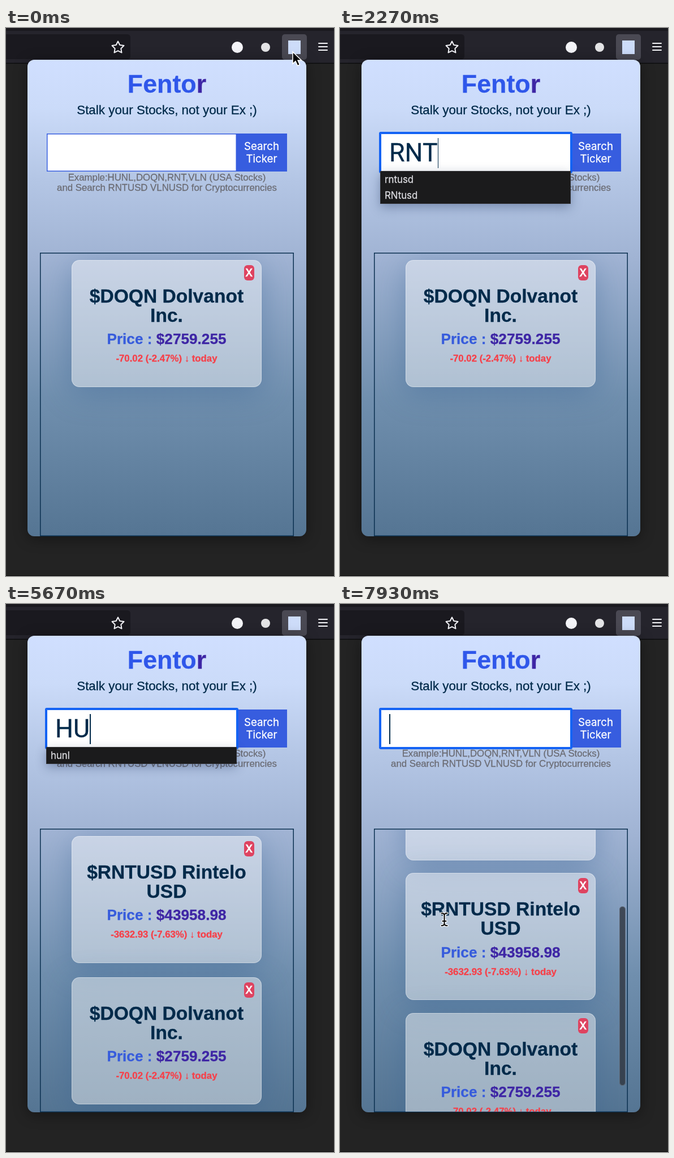
These frames come from a looping animation (580 by 966 pixels, 8000 ms). An HTML page:

```html
<!DOCTYPE html>
<html lang="en">
<head>
<meta charset="utf-8">
<title>Ticker popup</title>
<style>
html, body { margin: 0; width: 100%; height: 100%; overflow: hidden; background: #232323; }
body {
  position: relative; font-family: "Liberation Sans", Arial, sans-serif; color: #012a4a; white-space: nowrap;
  box-shadow: inset 0 -1px #0d0d0e; -webkit-text-stroke: .3px;
}
div, svg { position: absolute; box-sizing: border-box; }
.center { left: 0; width: 100%; text-align: center; }
#bar { left: 0; top: 0; width: 580px; height: 63px; }
#popup {
  left: 38px; top: 56px; width: 493px; height: 840px; border-radius: 12px; overflow: hidden;
  background: linear-gradient(#d0dfff, #cbdbf9 10%, #b4c6e5 25%, #a0b3d3 42%, #708fae 71%, #557593);
}
#shade { left: 38px; top: 56px; width: 493px; height: 840px; border-radius: 12px; box-shadow: 0 4px 24px rgba(0,0,0,.4); }
#title { top: 14px; font: bold 44.8px/56px "Liberation Sans", Arial, sans-serif; color: #2f57ea; }
#title b, .price b { color: #3e26a5; }
#tag { top: 75px; font-size: 22.4px; line-height: 28px; }
#hint { top: 199px; font-size: 16.8px; line-height: 17.5px; color: #6b6c74; }
#field { left: 34px; top: 130px; width: 336px; height: 67px; background: #fff; box-shadow: inset 0 0 0 1.5px #375ee0; }
#field.focus { box-shadow: 0 0 0 3px #1463f4, inset 0 0 0 1px #1463f4; border-radius: 1px; }
#entry { left: 15px; top: 0; height: 68px; display: flex; align-items: center; font: 44.8px/60px Roboto, sans-serif; }
#caret { width: 1.5px; height: 53px; background: #012a4a; }
#button {
  left: 369px; top: 130px; width: 90px; height: 67px; padding-top: 12px; background: #375ddf; color: #fff;
  text-align: center; font: 18.67px/22.4px Inter, sans-serif;
}
#menu {
  left: 33px; top: 196px; width: 337px; padding: 1px 8px; background: #1b1b1c; color: #dcdce0; white-space: pre;
  font: 16.8px/28px Inter, sans-serif; box-shadow: 0 6px 18px rgba(20,40,80,.35), inset 0 0 0 1px #333336;
}
#list { left: 22px; top: 340px; width: 448.5px; height: 500px; box-shadow: inset 0 0 0 1.5px #0b3050; }
#view { left: 1.5px; top: 1.5px; width: 445.5px; height: 497px; overflow: hidden; }
.card {
  left: 54.5px; width: 336px; height: 224px; border-radius: 14px; padding-top: 46px; text-align: center; font-weight: bold;
  background: rgba(255,255,255,.43); border: 1.5px solid rgba(255,255,255,.36);
  box-shadow: 0 10px 54px rgba(50,95,145,.4);
}
.name, .price, .change { display: block; }
.name { font-size: 33.6px; line-height: 34.4px; }
.price { font-size: 26.2px; line-height: 48px; color: #375cdc; }
.change { font-size: 16.8px; line-height: 21px; color: #f6414a; }
.close {
  right: 12px; top: 8px; width: 18.5px; height: 27px; border-radius: 6px; background: #de4360; color: #fff;
  font: 600 18.67px/28px Inter, sans-serif; display: flex; justify-content: center;
}
#thumb { left: 434px; width: 11px; height: 316px; border-radius: 6px; background: rgba(48,54,64,.82); box-shadow: inset 0 0 0 1px rgba(150,160,175,.4); }
#cursor { left: 0; top: 0; overflow: visible; }
</style>
</head>
<body>
<svg id="bar" viewBox="0 0 580 63">
  <path fill="#25242c" d="M0 0h580v62H0z"/>
  <path fill="#1a191f" d="M0 0h580v5H0zM0 11h214q6 0 6 6v32q0 6-6 6H0z"/>
  <path fill="#0d0d0e" d="M0 61.5h580v1.5H0z"/>
  <rect x="488" y="11" width="44" height="45" rx="5" fill="#4a4953"/>
  <rect x="499" y="22" width="22" height="24" fill="#cddcf9"/>
  <circle cx="409" cy="34" r="10" fill="#f4f4f8"/>
  <circle cx="459" cy="34" r="8" fill="#e4e4e6"/>
  <path id="star" fill="none" stroke="#f4f4f8" stroke-width="2" stroke-linejoin="round"/>
  <path stroke="#f4f4f8" stroke-width="2" stroke-linecap="round" d="M553 27h15M553 33h15M553 39h15"/>
</svg>
<div id="shade"></div>
<div id="popup">
  <div id="title" class="center">Fento<b>r</b></div>
  <div id="tag" class="center">Stalk your Stocks, not your Ex ;)</div>
  <div id="hint" class="center">Example:HUNL,DOQN,RNT,VLN (USA Stocks)<br>and Search RNTUSD VLNUSD for Cryptocurrencies</div>
  <div id="button">Search<br>Ticker</div>
  <div id="field"><div id="entry"><span id="typed"></span><span id="caret"></span></div></div>
  <div id="list"><div id="view"></div><div id="thumb"></div></div>
  <div id="menu"></div>
</div>
<svg id="cursor" width="1" height="1">
  <path id="arrow" fill="#000" stroke="#fff" stroke-width="1.5" d="M0 0V21L5 16.5L8.6 24.5L12.4 22.8L9 15H15.5Z"/>
  <g id="beam" fill="none" stroke-linecap="round">
    <path id="beamEdge" stroke="#fff" stroke-width="4.5"/>
    <path id="beamCore" stroke="#000" stroke-width="2"/>
  </g>
</svg>
<script>
const LOOP = 8000, FPS = 15;
const $ = id => document.getElementById(id);
const show = (el, on) => { el.style.visibility = on ? 'visible' : 'hidden'; };
const ramp = (t, a, b) => Math.min(1, Math.max(0, (t - a) / (b - a)));
const smooth = x => x * x * (3 - 2 * x);
const mix = (a, b, k) => a + (b - a) * k;

$('star').setAttribute('d', 'M' + Array.from({ length: 10 }, (_, i) => {
  const a = i * Math.PI / 5, r = i % 2 ? 5.6 : 11;
  return (198 + r * Math.sin(a)).toFixed(1) + ' ' + (34.5 - r * Math.cos(a)).toFixed(1);
}).join('L') + 'Z');
for (const id of ['beamEdge', 'beamCore'])
  $(id).setAttribute('d', 'M-5 -11Q0 -11 0 -7Q0 -11 5 -11M0 -7V7M-5 11Q0 11 0 7Q0 11 5 11M-3 3H3');

// Newest first; each card appears at its own time.
const cards = [
  [6600, '$HUNL Hunel Inc.', '$142.4', '-3.66 (-2.51%)'],
  [4400, '$RNTUSD Rintelo<br>USD', '$43958.98', '-3632.93 (-7.63%)'],
  [0, '$DOQN Dolvanot<br>Inc.', '$2759.255', '-70.02 (-2.47%)']
].map(([since, name, price, change]) => {
  const el = document.createElement('div');
  el.className = 'card';
  el.innerHTML = `<div class="close">X</div><span class="name">${name}</span>` +
    `<span class="price">Price : <b>${price}</b></span><span class="change">${change} ↓ today</span>`;
  $('view').append(el);
  return { since, el };
});

const history = ['rntusd', 'ranusd', 'RNtusd', 'hunl'];
const entries = [
  { word: 'RNTUSD', keys: [1330, 1730, 2130, 2530, 2600, 2800], enter: 3000, clear: 4400 },
  { word: 'HUNL', keys: [5000, 5330, 5670, 6000], enter: 6200, clear: 6600 }
];
const FOCUS = 600;

function drawField(t) {
  let text = '', busy = false, last = FOCUS;
  for (const { word, keys, enter, clear } of entries) {
    const pressed = keys.filter(k => t >= k);
    if (pressed.length) last = pressed.at(-1);
    if (t >= clear) last = clear;
    else if (pressed.length) {
      text = word.slice(0, pressed.length);
      busy = t >= enter;
    }
  }
  $('field').className = t >= FOCUS ? 'focus' : '';
  $('typed').textContent = text;
  show($('caret'), t >= FOCUS && !busy && (t - last) % 1000 < 500);
  const matches = text && !busy ? history.filter(h => h.toLowerCase().startsWith(text.toLowerCase())) : [];
  $('menu').textContent = matches.join('\n');
  show($('menu'), matches.length);
}

function drawCards(t, scroll) {
  const live = cards.filter(c => t >= c.since);
  const step = live.length > 2 ? 246.5 : 249;
  for (const c of cards) c.el.style.display = t >= c.since ? 'block' : 'none';
  live.forEach((c, i) => { c.el.style.top = 11 + i * step - scroll + 'px'; });
  $('thumb').style.top = 3 + scroll * 0.74 + 'px';
  show($('thumb'), live.length > 2);
}

function drawCursor(t, scroll) {
  const a = smooth(ramp(t, 30, 570)), b = smooth(ramp(t, 6660, 7340));
  const x = mix(mix(507, 240, a), 184.5, b), y = mix(mix(42, 222, a), 556, b);
  const seen = t < 1330 || t > 6660;
  const beam = scroll > 145 || (x < 407 && y > 187 && y < 253);
  $('cursor').style.transform = `translate(${x}px,${y}px)`;
  show($('arrow'), seen && !beam);
  show($('beam'), seen && beam);
}

function frame(now) {
  const t = Math.floor((now % LOOP + 5) * FPS / 1000) * 1000 / FPS % LOOP;
  const scroll = 181 * ramp(t, 7594, 7933) ** 2;
  drawField(t);
  drawCards(t, scroll);
  drawCursor(t, scroll);
  requestAnimationFrame(frame);
}
requestAnimationFrame(frame);
</script>
</body>
</html>
```
